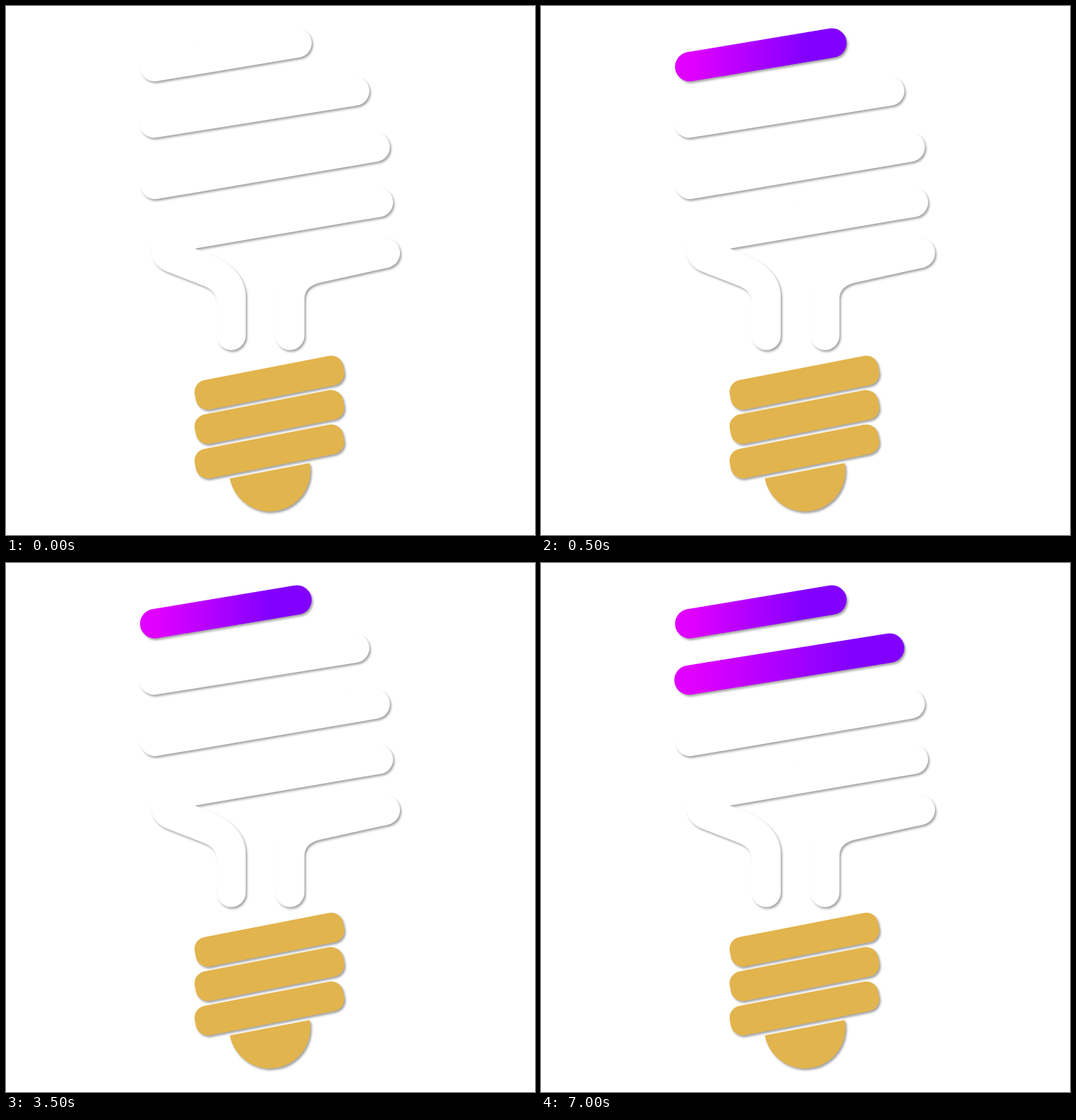
Animation, 748 px wide and 748 px high, one loop 8 s. Source, as an HTML page:

```html
<!DOCTYPE html>
<html lang="en">
<head>
<meta charset="utf-8">
<title>Bulb</title>
<style>
  html, body { margin: 0; width: 100%; height: 100%; overflow: hidden; background: #fff; }
  svg { display: block; width: 100%; height: 100%; }
</style>
</head>
<body>
<svg viewBox="0 0 748 748">
  <defs>
    <linearGradient id="glow">
      <stop offset=".1" stop-color="#df00ff"/>
      <stop offset=".76" stop-color="#8200ff"/>
    </linearGradient>
    <filter id="shadow" filterUnits="userSpaceOnUse" x="0" y="0" width="748" height="748" color-interpolation-filters="sRGB">
      <feDropShadow dx="2" dy="2.5" stdDeviation="1.5" flood-color="#000" flood-opacity=".36"/>
    </filter>
  </defs>
  <g id="tubes" fill="#fff">
    <path filter="url(#shadow)" d="M524 257 L226 306 C211 310 205 325 205 345 C205 358 214 370 226 375 L280 396 Q298 403 298 420 V466 A20.5 20.5 0 0 0 339 466 V410 C339 388 324 370 306 360 Q294 353 267 343 L530.8 298 A20.8 20.8 0 0 0 524 257 Z"/>
    <path filter="url(#shadow)" d="M531.5 328.6 L430 351 C400 358 381 380 381 410 V466 A20.5 20.5 0 0 0 422 466 V414 C422 401 431 394 445 391 L540.5 369.9 A20.8 20.8 0 0 0 531.5 328.6 Z"/>
  </g>
  <g id="base" fill="#e2b44d">
    <path filter="url(#shadow)" d="M316.5 668 L429.5 646.3 A57.5 57.5 0 0 1 316.5 668 Z"/>
  </g>
</svg>
<script>
const LOOP = 8000;
const RADIUS = 20.8;

// Centres of both round ends, and the time at which the bar lights up.
const bars = [
  { ends: [210.3, 85.8, 411.4, 52.3], on: 500 },
  { ends: [209.3, 165.5, 493, 120.3], on: 5500 },
  { ends: [210.5, 252.3, 522, 199.5], on: Infinity }
];

function add(parent, tag, attrs) {
  const el = document.createElementNS('http://www.w3.org/2000/svg', tag);
  for (const key in attrs) el.setAttribute(key, attrs[key]);
  return document.getElementById(parent).appendChild(el);
}

function pill([x1, y1, x2, y2]) {
  const len = Math.hypot(x2 - x1, y2 - y1);
  const nx = (y2 - y1) / len * RADIUS;
  const ny = (x1 - x2) / len * RADIUS;
  const arc = `A${RADIUS} ${RADIUS} 0 0 1`;
  return `M${x1 + nx} ${y1 + ny} L${x2 + nx} ${y2 + ny} ${arc} ${x2 - nx} ${y2 - ny} ` +
    `L${x1 - nx} ${y1 - ny} ${arc} ${x1 + nx} ${y1 + ny} Z`;
}

for (const bar of bars) {
  bar.el = add('tubes', 'path', { d: pill(bar.ends), filter: 'url(#shadow)' });
}

for (let i = 0; i < 3; i++) {
  const g = add('base', 'g', { filter: 'url(#shadow)' });
  const ring = add('base', 'rect', {
    x: -106.8, y: -21.1, width: 213.6, height: 42.2, rx: 17,
    transform: `translate(372.5 ${532.6 + i * 48.6}) rotate(-11)`
  });
  g.appendChild(ring);
}

function draw(t) {
  for (const bar of bars) {
    bar.el.setAttribute('fill', t >= bar.on ? 'url(#glow)' : '#fff');
  }
}

const start = performance.now();
function tick() {
  draw((performance.now() - start) % LOOP);
  requestAnimationFrame(tick);
}
tick();
</script>
</body>
</html>
```
